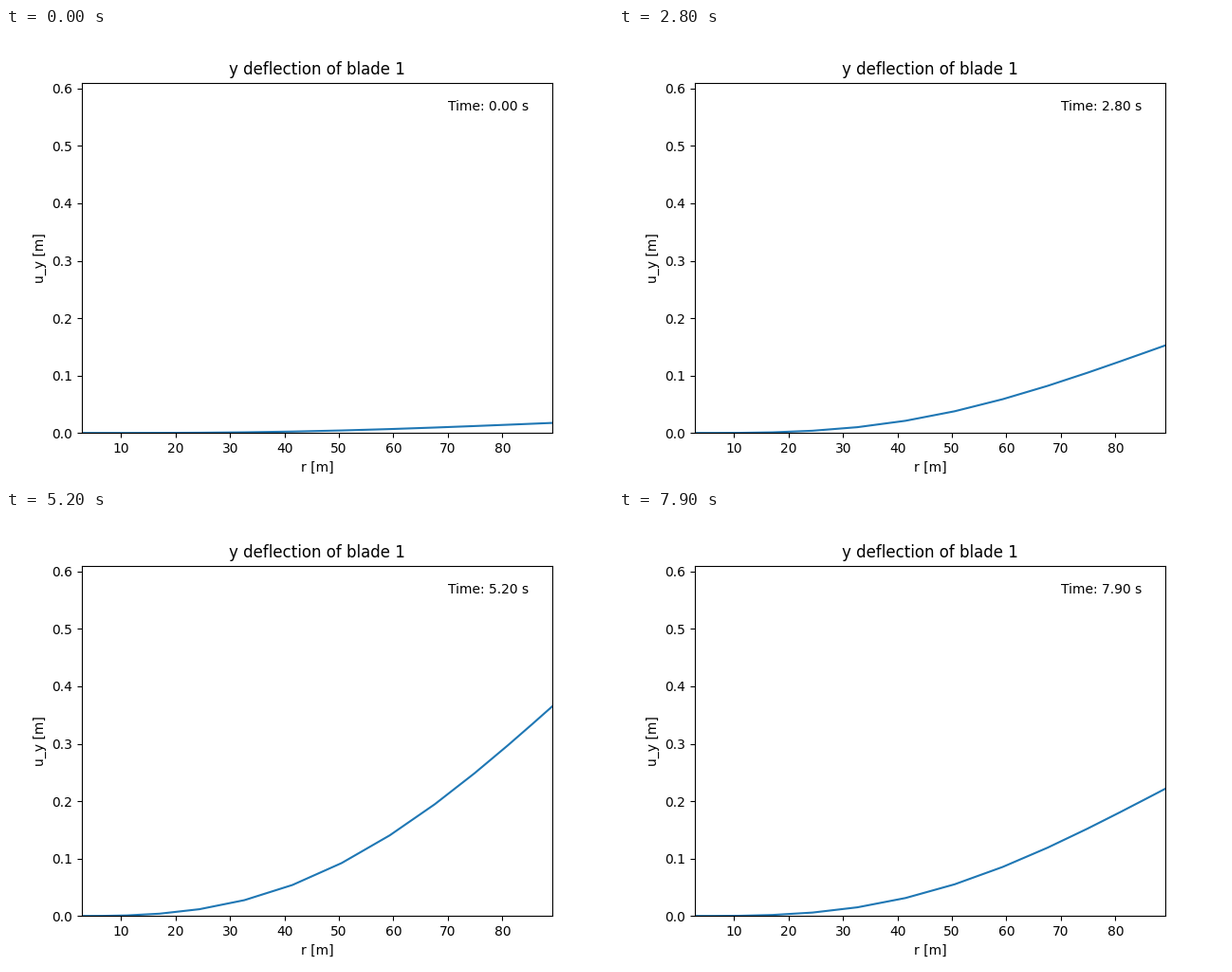
Write a matplotlib script that moves like this. It is 640 px wide and 480 px high and loops after 8000 ms.

```python
import numpy as np
import matplotlib.pyplot as plt
from matplotlib.animation import FuncAnimation

FRAMES, STEP_MS = 80, 100
ROOT, TIP = 2.8, 89.166
TOP = 0.6104

# Blade stations with half-cosine spacing, 0 at the root and 1 at the tip
s = (1 - np.cos(np.linspace(0, np.pi, 16))) / 2
r = ROOT + (TIP - ROOT) * s


def tip(t):
    """Slow start, then a damped swing around a slowly falling mean."""
    if t < 0.95:
        return 0.0175 + 0.17 * (t / 0.9) ** 4
    tau = t - 1.2
    mean = 0.3696 - 0.00111 * tau ** 2
    wave = 0.2478 * np.exp(-0.0658 * tau) * np.cos(6.0373 * tau - 0.517)
    return min(mean + wave, TOP)


def deflection(t):
    """Power curve whose exponent falls towards the tip."""
    u = tip(t)
    low = np.clip((1 / u - 1.7) / 3, 0, 1.1)
    power = (1 - low) * (2.42 - 0.38 * s ** 2) + low * (2.87 - 0.95 * s)
    return u * s ** power


fig, ax = plt.subplots(figsize=(6.4, 4.8), dpi=100)
line, = ax.plot(r, deflection(0))
label = ax.text(70, 0.92 * TOP, "")
ax.set(xlim=(ROOT, TIP), ylim=(0, TOP), xlabel="r [m]", ylabel="u_y [m]",
       title="y deflection of blade 1")


def update(i):
    t = i * STEP_MS / 1000
    line.set_ydata(deflection(t))
    label.set_text(f"Time: {t:.2f} s")
    return line, label


anim = FuncAnimation(fig, update, frames=FRAMES, interval=STEP_MS,
                     repeat=True, repeat_delay=0)
plt.show()
```
